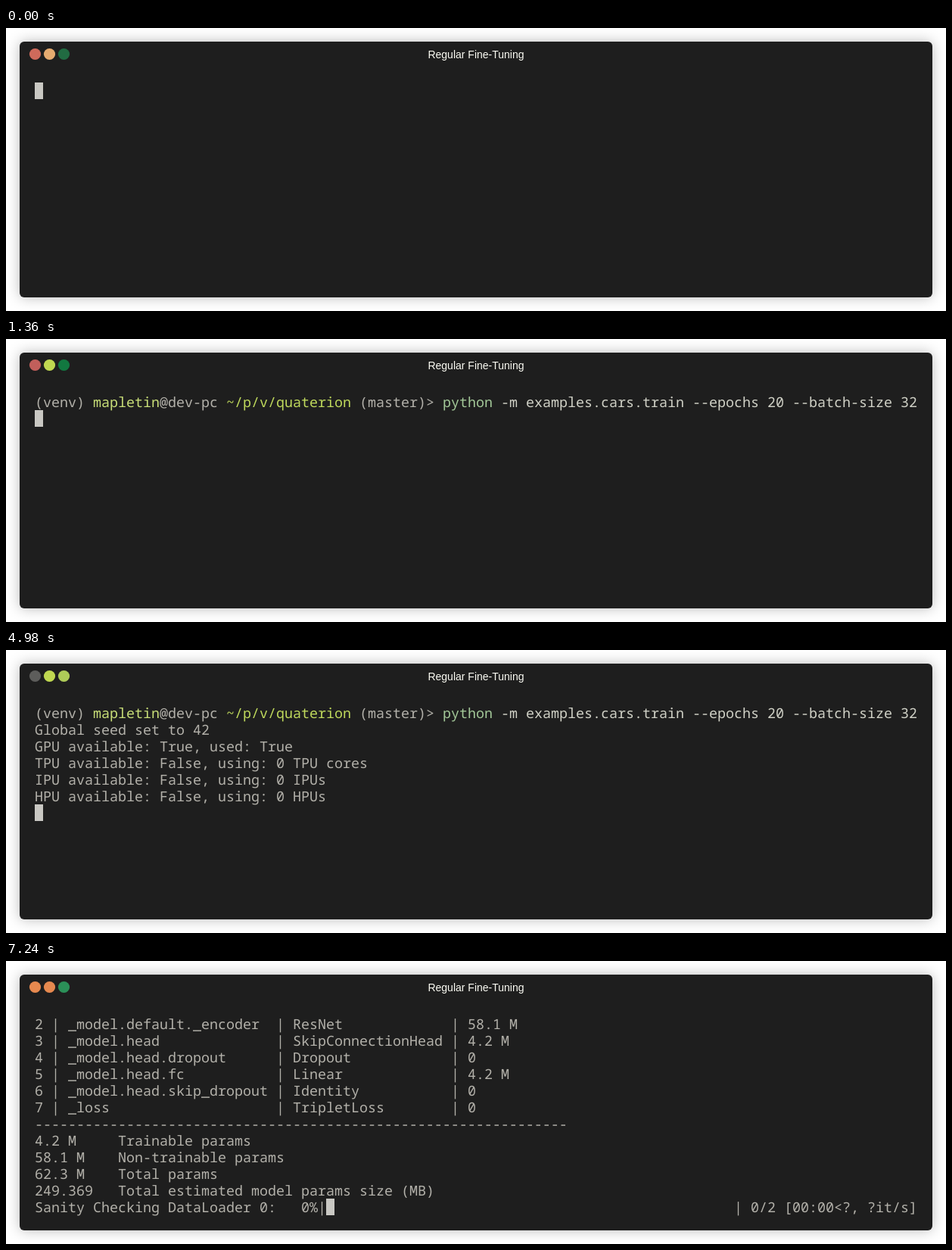
An HTML page that plays this animation: 1242x374 px, repeating every 8 s.

```html
<!DOCTYPE html>
<html lang="en">
<head>
<meta charset="utf-8">
<title>Regular Fine-Tuning</title>
<style>
  html, body { margin: 0; width: 100%; height: 100%; overflow: hidden; background: #fff; }
  svg { position: absolute; left: 0; top: 0; }
  .window {
    position: absolute; left: 18px; top: 18px; width: 1206px; height: 338px;
    border-radius: 6px; background: #1e1e1e; box-shadow: 0 0 18px rgba(0, 0, 0, .27);
  }
  .title { font: 14px "Liberation Sans", Arial, sans-serif; fill: #fcfcf4; text-anchor: middle; }
  .screen text {
    font: 18.3333px "Noto Sans Mono", "DejaVu Sans Mono", monospace;
    white-space: pre; text-rendering: geometricPrecision;
  }
</style>
</head>
<body>
<div class="window"></div>
<svg width="1242" height="374" viewBox="0 0 1242 374">
  <g id="dots"></g>
  <text class="title" x="621" y="40">Regular Fine-Tuning</text>
  <g class="screen" id="screen"></g>
</svg>
<script>
const LOOP = 8000, CELL = 11, LINE = 22, LEFT = 38, TOP = 72, BASELINE = 18;
const COLOR = {
  text: '#b3b1aa', user: '#c8de78', path: '#bfd95c', command: '#a3c898',
  args: '#d0d1c6', hint: '#717264', invalid: '#9c7268', back: '#1e1e1e', cursor: '#c9c8c3'
};

const dots = document.getElementById('dots');
const screen = document.getElementById('screen');

function add(parent, tag, attrs, content = '') {
  const node = document.createElementNS('http://www.w3.org/2000/svg', tag);
  for (const key in attrs) node.setAttribute(key, attrs[key]);
  node.textContent = content;
  parent.appendChild(node);
  return node;
}

const lights = [38.5, 57.5, 76.5].map(cx => add(dots, 'circle', { cx, cy: 34.5, r: 7.6 }));

// A line is a list of [text, color] runs.
const plain = text => [[text, COLOR.text]];

const prompt = [
  ['(venv) ', COLOR.text], ['mapletin', COLOR.user], ['@dev-pc ', COLOR.text],
  ['~/p/v/quaterion', COLOR.path], [' (master)> ', COLOR.text]
];
const promptWidth = prompt.reduce((sum, run) => sum + run[0].length, 0);
const command = 'python -m examples.cars.train --epochs 20 --batch-size 32';
const entered = [...prompt, ['python', COLOR.command], [command.slice(6), COLOR.args]];

const typing = count => ({
  lines: [[...prompt, [command.slice(0, count), COLOR.invalid], [command.slice(count), COLOR.hint]]],
  cursor: [promptWidth + count, 0],
  under: command[count]
});

const log = [
  'Global seed set to 42',
  'GPU available: True, used: True',
  'TPU available: False, using: 0 TPU cores',
  'IPU available: False, using: 0 IPUs',
  'HPU available: False, using: 0 HPUs',
  'LOCAL_RANK: 0 - CUDA_VISIBLE_DEVICES: [0]'
].map(plain);

const running = count => ({ lines: [entered, ...log.slice(0, count)], cursor: [0, count + 1] });

const layers = [
  ['_model.default._encoder', 'ResNet', '58.1 M'],
  ['_model.head', 'SkipConnectionHead', '4.2 M'],
  ['_model.head.dropout', 'Dropout', '0'],
  ['_model.head.fc', 'Linear', '4.2 M'],
  ['_model.head.skip_dropout', 'Identity', '0'],
  ['_loss', 'TripletLoss', '0']
];
const summary = [
  ...layers.map(([name, type, size], i) =>
    `${i + 2} | ${name.padEnd(24)} | ${type.padEnd(18)} | ${size}`),
  '-'.repeat(64),
  ...[
    ['4.2 M', 'Trainable params'],
    ['58.1 M', 'Non-trainable params'],
    ['62.3 M', 'Total params'],
    ['249.369', 'Total estimated model params size (MB)']
  ].map(([size, label]) => size.padEnd(10) + label)
];
const checking = status => ({ lines: [...summary, status].map(plain), cursor: [35, 11] });
const progress = 'Sanity Checking DataLoader 0:   0%|'.padEnd(84) + '| 0/2 [00:00<?, ?it/s]';

const states = [
  { at: 0, lights: '#cf6a5b #e6ab70 #216b42', lines: [], cursor: [0, 0] },
  { at: 100, lights: '#bd5f5c #c0d850 #44844c', lines: [prompt], cursor: [promptWidth, 0] },
  { at: 860, lights: '#bd5f5c #c0d850 #44844c', ...typing(1) },
  { at: 1140, lights: '#bd5f5c #c0d850 #44844c', ...typing(2) },
  { at: 1280, lights: '#bd5f5c #c0d850 #44844c', ...typing(3) },
  { at: 1360, lights: '#c25f5b #c0d850 #127840', ...running(0) },
  { at: 2010, lights: '#c25f5b #c0d850 #127840', ...running(0) },
  { at: 3540, lights: '#956a5f #c0d850 #127840', ...running(1) },
  { at: 4980, lights: '#5d5d5b #c0d850 #aecb58', ...running(5) },
  { at: 6980, lights: '#5d5d5b #c0d850 #4b9168', ...running(6) },
  { at: 7010, lights: '#e6894f #e6894f #2b9058', ...checking('Sanity Checking: 0it [00:00, ?it/s]') },
  { at: 7240, lights: '#e6894f #e6894f #2b9058', ...checking(progress) }
];

function write(text, column, row, fill) {
  // Words are anchored to the character grid.
  for (const word of text.matchAll(/\S+/g)) {
    add(screen, 'text', {
      x: LEFT + (column + word.index) * CELL, y: TOP + row * LINE + BASELINE, fill
    }, word[0]);
  }
}

function draw(state) {
  state.lights.split(' ').forEach((fill, i) => lights[i].setAttribute('fill', fill));
  screen.replaceChildren();
  state.lines.forEach((runs, row) => {
    let column = 0;
    for (const [text, fill] of runs) {
      write(text, column, row, fill);
      column += text.length;
    }
  });
  const [column, row] = state.cursor;
  add(screen, 'rect', {
    x: LEFT + column * CELL, y: TOP + row * LINE, width: CELL, height: LINE, fill: COLOR.cursor
  });
  if (state.under) write(state.under, column, row, COLOR.back);
}

let shown;
function update(now) {
  const time = now % LOOP;
  const state = states.findLast(s => s.at <= time);
  if (state !== shown) draw(shown = state);
}

const start = performance.now();
function tick() {
  update(performance.now() - start);
  requestAnimationFrame(tick);
}
tick();
</script>
</body>
</html>
```
